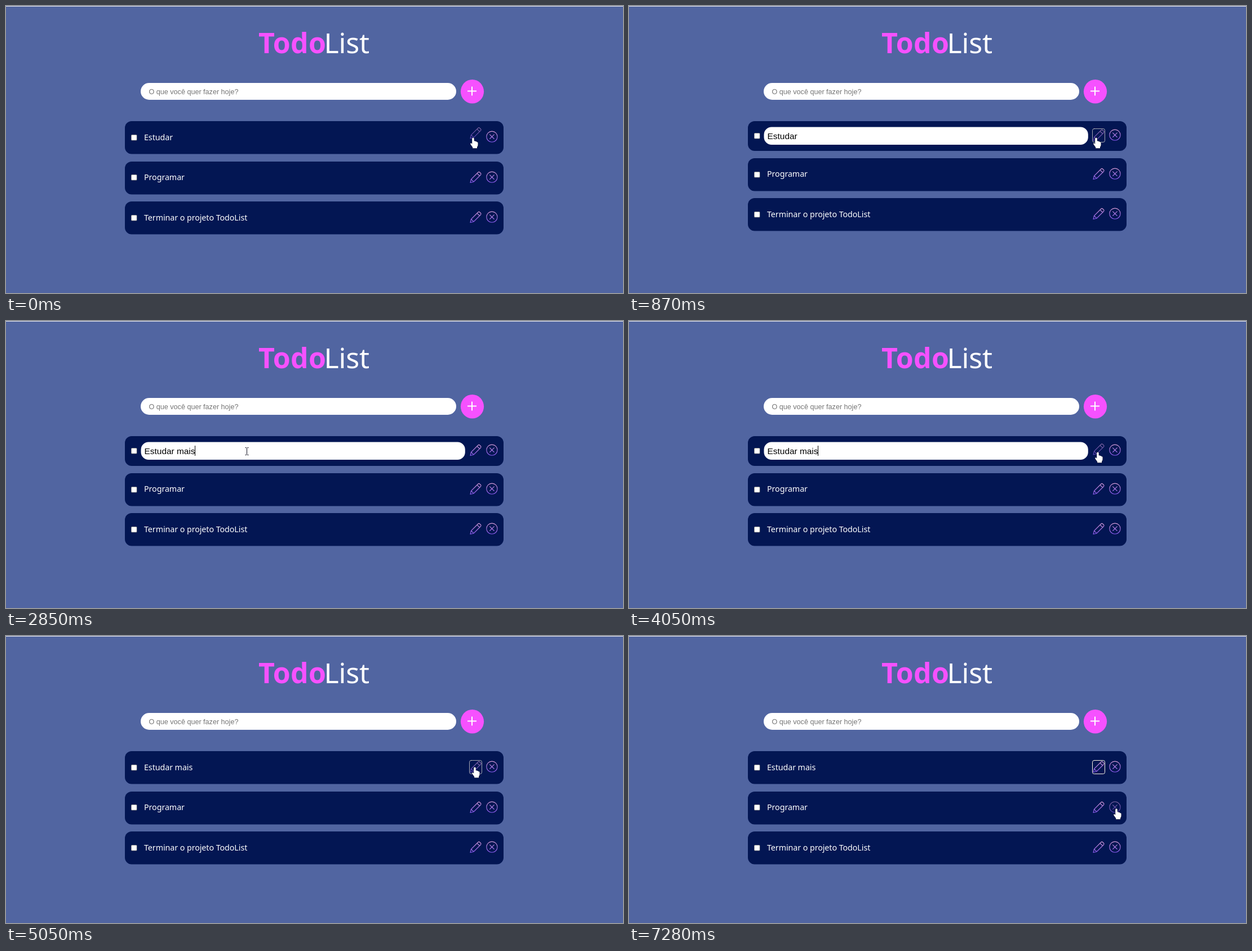
These frames come from a looping animation (1095x511 px, 8 s). An HTML page with a canvas:

```html
<!DOCTYPE html>
<html lang="pt-BR">
<head>
<meta charset="utf-8">
<title>TodoList</title>
<style>
  html, body { margin: 0; width: 100%; height: 100%; overflow: hidden; background: #5165a1; }
  canvas { display: block; width: 1095px; height: 511px; }
</style>
</head>
<body>
<canvas id="stage" width="1095" height="511"></canvas>
<script>
const ctx = document.getElementById('stage').getContext('2d');
const LOOP = 8000;
const NAVY = '#031653', PINK = '#f651ff';
const SANS = '"Noto Sans", "Open Sans", sans-serif';
const ARIAL = '"Liberation Sans", Arial, sans-serif';

const EDIT_START = 740, CLICK_FIELD = 1670, TYPE_START = 2190, KEY_DELAY = 130;
const CLICK_SAVE = 4920, EDIT_END = 5050;

const HOME = { x: 829, y: 235 };
const MOVES = [
  { from: 930, to: 1510, x: 427, y: 232 },
  { from: 3450, to: 4050, x: 832, y: 234 },
  { from: 5650, to: 5980, x: 872, y: 328 },
  { from: 6150, to: 6390, x: 865, y: 308 }
];

const clamp = (v, lo, hi) => Math.max(lo, Math.min(hi, v));
const between = (t, a, b) => t >= a && t < b;

// Each move slows down towards its goal.
function pointerAt(t) {
  return MOVES.reduce((p, m) => {
    const k = 1 - (1 - clamp((t - m.from) / (m.to - m.from), 0, 1)) ** 3;
    return { x: p.x + (m.x - p.x) * k, y: p.y + (m.y - p.y) * k };
  }, HOME);
}

// The CSS "ease" curve, solved by bisection.
function ease(x) {
  let s = 0.5;
  for (let step = 0.25; step > 1e-5; step /= 2) {
    s += 0.75 * s * (1 - s) + s ** 3 < x ? step : -step;
  }
  return 0.3 * (1 - s) ** 2 * s + 3 * (1 - s) * s * s + s ** 3;
}

// One-second hop of a hovered icon.
function hop(t) {
  if (t <= 0 || t >= 1000) return 0;
  return -9 * (t < 500 ? ease(t / 500) : 1 - ease((t - 500) / 500));
}

function box(x, y, w, h, r, fill) {
  ctx.beginPath();
  ctx.roundRect(x, y, w, h, r);
  ctx.fillStyle = fill;
  ctx.fill();
}

function text(str, x, y, font, color, spacing = 0) {
  ctx.font = font;
  ctx.letterSpacing = spacing + 'px';
  ctx.fillStyle = color;
  ctx.fillText(str, x, y);
  return ctx.measureText(str).width;
}

const PENCIL = new Path2D('M-9.5 9.5L-8 3.5L4.5 -9Q5.8 -10.2 7 -9L9 -7Q10.2 -5.8 9 -4.5L-3.5 8Z' +
  'M2.5 -7L7 -2.5M-8 3.5L-3.5 8');
const REMOVE = new Path2D('M9.6 0A9.6 9.6 0 1 1 -9.6 0A9.6 9.6 0 1 1 9.6 0' +
  'M-3.8 -3.8L3.8 3.8M3.8 -3.8L-3.8 3.8');
const HAND = new Path2D('M-1.8 1.2Q-1.6 -.5 0 -.5Q1.6 -.5 1.7 1.2V5.5Q3.7 4.8 4.1 6.3Q6 5.6 6.4 7.2' +
  'Q8.3 6.8 8.5 8.6V12.5Q8.3 14.5 7 16V18.2H-.8V16.4L-4.4 11.6Q-5.4 9.8 -4.2 9.3Q-3 9 -1.8 10.7Z');
const ARROW = new Path2D('M0 0V13L3 10.2L5.2 15L7.3 14L5.2 9.4H9Z');
const BEAM = new Path2D('M-3 -6.5H-1L0 -5.5L1 -6.5H3M0 -5.5V5.5M-3 6.5H-1L0 5.5L1 6.5H3');

const iconInk = ctx.createLinearGradient(0, -10, 0, 10);
iconInk.addColorStop(0, '#d59bd4');
iconInk.addColorStop(1, '#8656ee');

function icon(shape, x, y, { hovered = false, lift = 0, focused = false } = {}) {
  ctx.save();
  ctx.translate(x, y + lift);
  ctx.globalAlpha = hovered ? 0.65 : 1;
  ctx.lineWidth = 1.1;
  ctx.lineJoin = ctx.lineCap = 'round';
  ctx.strokeStyle = iconInk;
  ctx.stroke(shape);
  if (focused) {
    ctx.beginPath();
    ctx.roundRect(-11, -11.5, 22, 24, 3);
    ctx.lineWidth = 1;
    ctx.strokeStyle = '#fff4e4';
    ctx.stroke();
  }
  ctx.restore();
}

function cursor({ x, y }, onIcon, editing) {
  const beam = !onIcon && editing && between(x, 239, 815) && between(y, 215, 247);
  const shape = onIcon ? HAND : beam ? BEAM : ARROW;
  ctx.save();
  ctx.translate(beam ? Math.floor(x) + 0.5 : x, y);
  ctx.lineWidth = 1;
  ctx.strokeStyle = '#101020';
  ctx.stroke(shape);
  ctx.fillStyle = '#fff';
  if (!beam) ctx.fill(shape);
  ctx.restore();
}

function header() {
  ctx.fillStyle = '#5165a1';
  ctx.fillRect(0, 0, 1095, 511);
  ctx.fillStyle = '#eeeef2';
  ctx.fillRect(0, 0, 1095, 1);
  text('Todo', 448, 84, '700 50px ' + SANS, PINK, 0.3);
  text('List', 564.5, 84, '400 50px ' + SANS, '#fff', -0.2);

  box(239, 137, 560, 30, 15, '#fff');
  text('O que você quer fazer hoje?', 253.5, 156.5, '12.6px ' + ARIAL, '#757575');
  ctx.beginPath();
  ctx.ellipse(827.5, 152.3, 20.6, 21.3, 0, 0, 7);
  ctx.fillStyle = PINK;
  ctx.fill();
  ctx.fillStyle = '#fff';
  ctx.fillRect(819, 150.5, 16, 2);
  ctx.fillRect(826, 143.5, 2, 16);
}

function editField(t, str, typed) {
  box(239.5, 215.5, 575.3, 31.5, 13.5, '#fff');
  const end = 245.6 + text(str, 245.6, 237, '15.4px ' + ARIAL, '#000');
  const lastInput = typed ? TYPE_START + KEY_DELAY * typed : CLICK_FIELD;
  const blinkOn = (t - lastInput) % 1030 < 515;
  if (between(t, CLICK_FIELD, CLICK_SAVE) && blinkOn) ctx.fillRect(Math.round(end), 222, 1, 18);
}

function render(t) {
  const editing = between(t, EDIT_START, EDIT_END);
  const typed = clamp(Math.floor((t - TYPE_START) / KEY_DELAY), 0, 5);
  const first = 'Estudar' + ' mais'.slice(0, typed);
  const pointer = pointerAt(t);
  const onPencil = Math.abs(pointer.x - 834) < 12 && Math.abs(pointer.y - 232) < 14;
  const onRemove = Math.hypot(pointer.x - 862, pointer.y - 305) < 11;

  header();
  [first, 'Programar', 'Terminar o projeto TodoList'].forEach((task, i) => {
    const editRow = editing && i === 0;
    const top = 205 + 71.6 * i - (editing && i ? 5.8 : 0);
    const height = editRow ? 53 : 58.4;
    const mid = top + height / 2 - 1.3;
    box(211, Math.round(top), 672, height, 12, NAVY);

    const checkY = Math.round(mid - 4.2);
    box(222, checkY, 10.5, 10.5, 1.5, '#767676');
    box(222.7, checkY + 0.7, 9.1, 9.1, 1, '#fff');
    if (editRow) editField(t, task, typed);
    else text(task, 245, Math.round(mid + 5.7), '14.3px ' + SANS, '#fff', -0.08);

    icon(PENCIL, 833.5, Math.round(mid), i ? {} : {
      hovered: onPencil,
      lift: hop(t + 230) + hop(t - 3980),
      focused: between(t, EDIT_START, CLICK_FIELD) || t >= CLICK_SAVE
    });
    icon(REMOVE, 862.4, Math.round(mid) - 0.3,
      i === 1 ? { hovered: onRemove, lift: hop(t - 6320) } : {});
  });
  cursor(pointer, onPencil || onRemove, editing);
}

const start = performance.now();
function loop() {
  render((performance.now() - start) % LOOP);
  requestAnimationFrame(loop);
}
loop();
</script>
</body>
</html>
```
